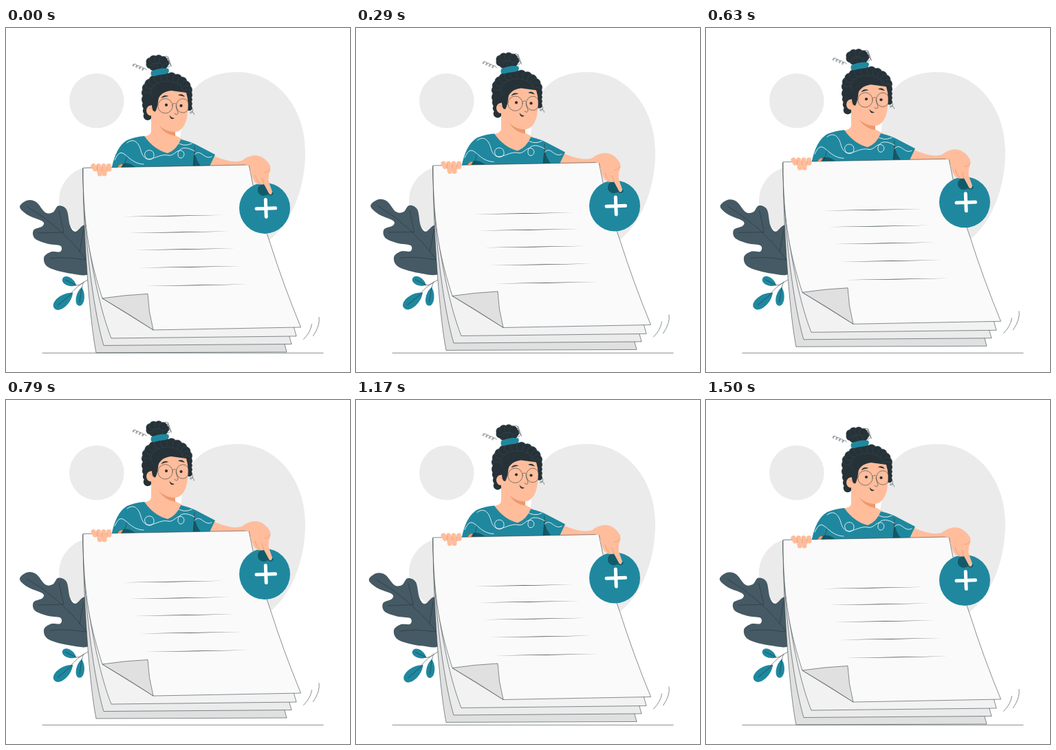
These frames come from a looping animation (500 by 500 pixels, 1.54 s). An HTML page:

```html
<!DOCTYPE html>
<html lang="en">
<head>
<meta charset="utf-8">
<title>Add a note</title>
<style>
  html, body { margin: 0; width: 100%; height: 100%; overflow: hidden; background: #fff; }
  svg { display: block; width: 100vw; height: 100vh; }
  .bg { fill: #ebebeb; }
  .ink { fill: none; stroke: #263238; stroke-width: .55; stroke-linecap: round; stroke-linejoin: round; }
  .sheet { stroke: #263238; stroke-width: .55; stroke-linejoin: round; }
  .teal { fill: #1f889f; }
  .deep { fill: #125a69; }
  .hair { fill: #263238; }
  .curly { stroke: #41555f; stroke-width: .4; }
  .skin { fill: #ffbd9c; }
  .finger { fill: none; stroke: #ffbd9c; stroke-width: 7; stroke-linecap: round; }
  .crease { fill: none; stroke: #eb996e; stroke-width: .8; stroke-linecap: round; }
  .swirl { fill: none; stroke: #fff; stroke-width: .85; stroke-linecap: round; }
</style>
</head>
<body>
<svg viewBox="0 0 500 500">
  <g class="bg">
    <circle cx="131.8" cy="105.8" r="39.8"/>
    <path d="M337 64C390 64 435 112 435 180C435 236 413 285 383 308L300 300C265 270 245 200 255 148Q258 64 337 64Z"/>
    <circle cx="127" cy="251" r="50"/>
  </g>
  <path class="ink" d="M53 472.4H461"/>

  <g id="leaf">
    <path id="oak" fill="#455a64"/>
    <path class="ink" d="M31 260Q80 288 118 338M77 266L84 297L47 298M64 335Q84 332 117 337M113 293L107 325"/>
  </g>
  <g id="twig">
    <path class="ink" d="M119 366Q104 374 94 386M111 371Q104 376 97 373M113 369Q109 376 110 388"/>
  </g>

  <g id="bob">
    <g id="hair" class="hair"></g>
    <path class="skin" d="M211 112L246 132V156L259 163L240 190L205 177L201 157.500Q211 156 211 150Z"/>
    <path fill="#eb996e" d="M222 141Q232 151 246 149V157Q231 155 222 141Z"/>
    <path class="skin" d="M217 132L219 110Q222 93 240 91L262 94Q267 110 263 130C261 142 254 151 245 151Q225 150 217 132Z"/>
    <ellipse class="skin" cx="210.500" cy="120" rx="6.500" ry="7.500"/>
    <path class="crease" d="M208 117Q212 115 214 121"/>
    <path class="hair" d="M212 104L222 100Q220 118 217 121.500Q211 122 212 104Z"/>
    <g class="ink">
      <circle cx="231.500" cy="113.300" r="10.700"/>
      <ellipse cx="257" cy="113" rx="9.500" ry="10.200"/>
      <path d="M242 111Q245 108 247.500 111M221 112L213 113M247 113Q248 118 250 123Q250 128 245 124.500"/>
    </g>
    <g class="hair">
      <circle cx="233" cy="112" r="2.100"/><circle cx="254.500" cy="113" r="2.100"/>
      <path d="M225.500 102Q229 96 236.500 99Q230 100 225.500 102ZM250 97.500Q256 94 260 100ZM237.500 126.500Q240 130.500 245 131Q239 135 237.500 126.500Z"/>
    </g>
    <path class="teal" d="M211 63Q224 57 236 59Q239 65 232 67Q222 68 215 70Q209 71 211 63Z"/>

    <path class="skin" d="M291 180L305 187Q329 197 342 193L360 185L362 205L286 207Z"/>
    <clipPath id="cut"><path id="top" d="M201 157Q215 177 235 182Q248 177 254 162Q269 165 281 172L304 184L293 207H153Q159 173 176 163Q188 158 201 157Z"/></clipPath>
    <use href="#top" class="teal"/>
    <path class="deep" d="M160 204Q174 189 190 204ZM271 206L274 176Q274 192 288 206Z"/>
    <path class="ink" d="M274 172L273 203M176 187L171 202"/>
    <g class="swirl" clip-path="url(#cut)">
      <path d="M176 167C186 159 193 167 196 178C200 195 216 194 215 184C214 174 199 177 202 186C206 198 222 182 235 185C244 187 246 178 254 178C262 180 259 190 253 189C246 187 250 165 274 179"/>
      <path d="M158 192C170 165 175 198 200 198M274 184C283 174 288 193 299 187M247 165Q258 174 270 168"/>
    </g>

    <g id="paper"></g>
    <path class="ink" d="M455 420.500Q457 432 446.500 447.500M444.500 430.500Q443 442 432.500 452.500"/>

    <g id="grip"></g>
    <path fill="#eb996e" d="M162 203Q165 197 170 198L167 203Z"/>

    <circle class="teal" cx="376" cy="262" r="37"/>
    <path class="deep" d="M366 238Q365 229 373 226L389 240Q386 246 381 242Q371 247 366 238Z"/>
    <path fill="none" stroke="#fff" stroke-width="5" stroke-linecap="round" d="M364 262.800L391.500 261.800M377.300 249.500L378.200 274.500"/>
    <path class="skin" d="M344 192Q354 184 366 185.500Q377 188 384 200Q385 207 382 213L381.500 222L387 238Q386 244 382.500 241L375 227Q362 230 358 217Q354 208 355 200L348 199Z"/>
    <path class="crease" d="M375 227L372 218M369 227Q363 220 362 214M376 210Q381 210 384 205"/>
  </g>
</svg>
<script>
  const LOOP = 1540, LAG = 40, LIFT = 4.55, SWAY = .9;
  const $ = id => document.getElementById(id);
  const add = (id, html) => $(id).insertAdjacentHTML('beforeend', html);
  const times = (n, f) => Array.from({ length: n }, (_, i) => f(i)).join('');

  // Closed smooth curve through key points.
  function smooth(text) {
    const p = text.split(' ').map(s => s.split(',').map(Number)), n = p.length;
    const bend = (a, b, c, s) => [0, 1].map(k => b[k] + s * (c[k] - a[k]) / 6);
    return `M${p[0]}` + times(n, i => {
      const [a, b, c, d] = [i + n - 1, i, i + 1, i + 2].map(j => p[j % n]);
      return `C${bend(a, b, c, 1)} ${bend(b, c, d, -1)} ${c}`;
    }) + 'Z';
  }
  $('oak').setAttribute('d', smooth('20,260 31,250.5 44,253 57,268 68,268 76,258.5 88,264 93,287 101,296 116,287 128,320 122,356 95,357 62,348 55,334 65,325.5 79,325 79,316.5 60,313.5 42,306 40,294 53,288 53,281 32,272'));

  const petal = (x, y, turn, len, w) => add('twig',
    `<g transform="translate(${x} ${y}) rotate(${turn})"><path class="teal" d="M0 0C${len * .3} ${-w} ${len} ${-w} ${len} 0C${len} ${w} ${len * .3} ${w} 0 0Z"/><path class="ink" d="M0 0H${len * .8}"/></g>`);
  petal(102, 374, 207, 22, 8);
  petal(97, 385, 140, 35, 11);
  petal(110, 377, 98, 27, 8);

  // Curly hair: puffs around an oval, and stray locks as stretched coils.
  function curls(x, y, rx, ry, r, from, to, n) {
    add('hair', `<ellipse cx="${x}" cy="${y}" rx="${rx + 2}" ry="${ry + 2}"/>` + times(n, i => {
      const a = (from + (to - from) * i / (n - 1)) * Math.PI / 180;
      return `<circle class="curly" cx="${x + rx * Math.cos(a)}" cy="${y + ry * Math.sin(a)}" r="${r}"/>`;
    }));
  }
  function lock(x, y, dx, dy, r, n) {
    const pts = times(n * 12 + 1, i => {
      const k = i / (n * 12), a = k * n * 2 * Math.PI;
      return `${x + dx * k + r * Math.cos(a)},${y + dy * k + r * Math.sin(a)} `;
    });
    add('hair', `<polyline class="ink" stroke-width=".8" points="${pts}"/>`);
  }
  curls(234, 93, 30, 22, 7, 160, 370, 13);
  curls(220, 51, 11, 6, 6, 0, 320, 9);
  add('hair', times(4, i => `<circle cx="${205 + i * .3}" cy="${104 + i * 8}" r="${8 - i * .6}"/><circle cx="266.5" cy="${98 + i * 6}" r="4.3"/>`));
  lock(184, 53, 18, 8, 2, 4);
  lock(232, 42, 5, 14, 3.5, 4);
  lock(267, 113, 4, 13, 2.5, 2);

  // The stack, from the bottom sheet up, then the top sheet with its folded corner.
  const edge = (x, y, dx) => `M112 204C112 295 ${x - dx} ${y - 50} ${x} ${y}`;
  const sheet = (d, fill) => add('paper', `<path class="sheet" fill="${fill}" d="${d}Z"/>`);
  ['#e0e0e0', '#ebebeb', '#f2f2f2'].forEach((fill, i) => {
    const k = 2 - i, x = 422 - 7 * k, y = 448 + 11.5 * k;
    sheet(`${edge(153 - 11 * k, 451 + 10.5 * k, 20 - 5 * k)}L${x} ${y}l-5 -18`, fill);
  });
  sheet(edge(140, 393, 16) + 'L214 439L428.5 435Q403 373 384 313Q364 259 353 199L112 203.5', '#fafafa');
  sheet('M140 393Q173 388 206 386.5Q207 412 214 439Q176 414 140 393', '#e0e0e0');

  add('paper', times(5, i => {
    const a = 170 + 8 * i, b = 316 + 9 * i, m = (a + b) / 2, y = 274.2 + 23.4 * i + .45 * i * i;
    return `<path class="hair" d="M${a} ${y}Q${m} ${y - 2} ${b} ${y - 2.5}Q${m} ${y - .2} ${a} ${y}Z"/>`;
  }));

  // Fingers over the top edge.
  const tip = i => 205 + 3.5 * i * (3 - i);
  add('grip', times(4, i => `<path class="finger" d="M${127 + 7.5 * i} 200.500L${129.5 + 6.8 * i} ${tip(i)}"/>`));
  add('grip', times(3, i => `<path class="crease" d="M${133 + 7 * i} ${207 + i}q-2 -3 0 -6"/>`));

  function draw(t) {
    const turn = ms => 2 * Math.PI * ms / LOOP;
    const lift = LIFT * (1 - Math.cos(turn(t + LAG)));
    const tilt = SWAY * Math.sin(turn(t));
    $('bob').setAttribute('transform', `translate(0 ${-lift})`);
    $('leaf').setAttribute('transform', `rotate(${tilt} 118 338)`);
    $('twig').setAttribute('transform', `rotate(${tilt} 118 367)`);
  }
  function tick() {
    draw(performance.now() % LOOP);
    requestAnimationFrame(tick);
  }
  tick();
</script>
</body>
</html>
```
